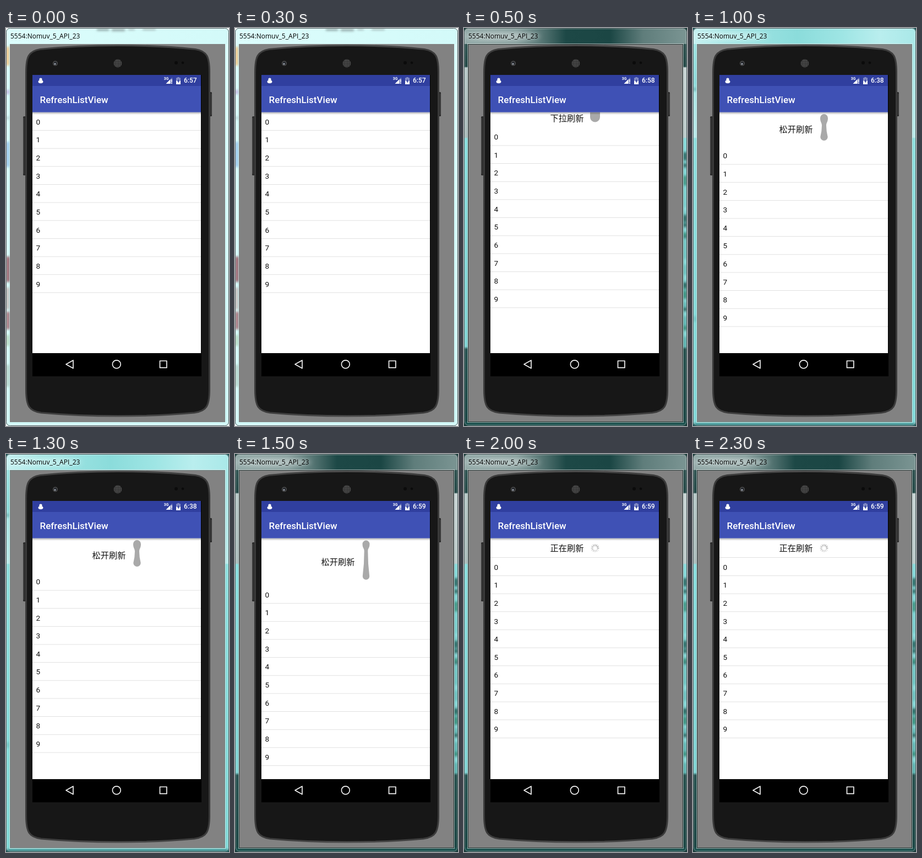
Animation of 405x721 px, one loop 2500 ms. Source, as an HTML page:

```html
<!DOCTYPE html>
<html lang="zh">
<head>
<meta charset="utf-8">
<title>RefreshListView</title>
<style>
html, body { margin: 0; width: 100%; height: 100%; overflow: hidden; background: #fff; }
svg { display: block; width: 405px; height: 721px; }
text { white-space: pre; }
.title { font: 12px "Open Sans", "Noto Sans", sans-serif; fill: #000; }
.bar { font: 500 17px Roboto, sans-serif; fill: #fff; }
.time { font: 500 12px Roboto, sans-serif; fill: #fff; }
.net { font: 700 6.8px Roboto, sans-serif; fill: #fff; }
.row { font: 13.6px Roboto, sans-serif; fill: #111; }
.hint { font: 15.2px "Noto Sans CJK SC", "Noto Sans CJK", "Noto Sans", sans-serif; fill: #111; }
</style>
</head>
<body>
<svg viewBox="0 0 405 721" xmlns="http://www.w3.org/2000/svg">
  <defs>
    <filter id="soft" x="-20%" y="-20%" width="140%" height="140%"><feGaussianBlur stdDeviation="2"/></filter>
    <filter id="glow" x="-20%" y="-100%" width="140%" height="300%"><feGaussianBlur stdDeviation="4"/></filter>
    <clipPath id="window"><rect width="405" height="721" rx="7"/></clipPath>
    <clipPath id="list"><rect x="48" y="152.6" width="306" height="436.4"/></clipPath>
    <linearGradient id="rim">
      <stop offset="0" stop-color="#3a3a3a"/><stop offset=".5" stop-color="#4c4c4c"/><stop offset="1" stop-color="#3a3a3a"/>
    </linearGradient>
    <linearGradient id="shade" x2="0" y2="1">
      <stop offset="0" stop-opacity=".3"/><stop offset="1" stop-opacity="0"/>
    </linearGradient>
    <pattern id="mesh" width="2.6" height="2.6" patternUnits="userSpaceOnUse">
      <circle cx="1.3" cy="1.3" r=".85" fill="#777"/>
    </pattern>
  </defs>

  <rect id="backdrop" width="405" height="721"/>
  <g id="glass" clip-path="url(#window)"></g>
  <rect id="shine" x="1.5" y="1.5" width="402" height="718" rx="6" fill="none" stroke="#fff"/>
  <rect x=".5" y=".5" width="404" height="720" rx="7" fill="none" stroke="#2b3f40" stroke-opacity=".85"/>
  <ellipse id="halo" cx="70" cy="15" rx="68" ry="8" fill="#fff" filter="url(#glow)"/>
  <text class="title" x="8" y="19">5554:Nomuv_5_API_23</text>

  <rect x="7" y="29" width="391" height="685" fill="#828282"/>
  <rect id="inner" x="7.5" y="29.5" width="390" height="684" fill="none"/>
  <rect id="outer" x="6.5" y="28.5" width="392" height="686" fill="none" stroke="#fff"/>

  <rect x="31" y="160" width="6" height="107" rx="1.5" fill="#2b2b2b"/>
  <rect x="31.5" y="163" width="1.2" height="101" fill="#4a4a4a"/>
  <rect x="369" y="116" width="5" height="44" rx="1.5" fill="#2b2b2b"/>
  <rect x="372.3" y="119" width="1" height="38" fill="#4a4a4a"/>
  <path fill="#171717" stroke="url(#rim)" stroke-width="3"
    d="M36.5 80C36.5 52 41 42 62 38.5Q130 31.5 203 31.5Q276 31.5 344 38.5C365 42 369.5 52 369.5 80V655C369.5 685 364 694 342 697Q276 703 203 703Q130 703 64 697C42 694 36.5 685 36.5 655Z"/>
  <circle cx="89.5" cy="64" r="4.6" fill="#4a4a4a"/>
  <circle cx="89.5" cy="64" r="3" fill="#22252a"/>
  <circle cx="89" cy="65" r="1.6" fill="#a5abb5"/>
  <circle cx="203" cy="64" r="7.6" fill="#222"/>
  <circle cx="203" cy="64" r="7.4" fill="url(#mesh)"/>
  <g fill="#0b0b0b"><circle cx="309" cy="63" r="3"/><circle cx="321" cy="63" r="2.2"/></g>

  <rect x="48" y="85" width="307" height="546" fill="#000"/>
  <rect x="48" y="152" width="306" height="437" fill="#fff"/>
  <g clip-path="url(#list)">
    <g id="rows"></g>
    <g id="head">
      <text id="hint" class="hint" x="156.6"></text>
      <path id="drop" fill="#a9a9a9"/>
      <g id="spin"></g>
    </g>
  </g>
  <rect x="48" y="152.6" width="306" height="4.4" fill="url(#shade)"/>
  <rect x="48" y="85" width="306" height="20" fill="#303f9f"/>
  <rect x="48" y="105" width="306" height="47.6" fill="#3f51b5"/>
  <text class="bar" x="61.6" y="135.6">RefreshListView</text>

  <g fill="#fff">
    <circle cx="63" cy="93" r="2.6"/>
    <ellipse cx="63" cy="97.3" rx="4.4" ry="3"/>
    <path d="M290.5 101L302 89.5V101Z" opacity=".35"/>
    <path d="M290.5 101L298.5 93V101Z"/>
    <path d="M300.2 93h1.5v5h-1.5zM300.2 99.3h1.5v1.7h-1.5z"/>
    <path d="M309 90.2h2.3V89h3.4v1.2h2.3v5.3h-8z" opacity=".4"/>
    <path d="M309 95.5h8V102h-8z"/>
  </g>
  <path d="M313.7 91.7L310.8 96.7H312.7V100.3L315.5 95.3H313.7Z" fill="#303f9f"/>
  <text class="net" x="286.8" y="94.3">3G</text>
  <text id="time" class="time" x="323" y="99.4"></text>

  <g fill="none" stroke="#f2f2f2" stroke-width="1.7" stroke-linejoin="round">
    <path d="M122 602V616.4L109 609.2Z"/>
    <circle cx="200.8" cy="609.2" r="7.4"/>
    <rect x="279.5" y="603" width="12.4" height="12.4"/>
  </g>
</svg>
<script>
const NS = 'http://www.w3.org/2000/svg';
const $ = id => document.getElementById(id);
const STEP = 500, TOP = 153, PITCH = 32.65, CX = 238;

function add(parent, tag, attrs) {
  const el = document.createElementNS(NS, tag);
  for (const k in attrs) el.setAttribute(k, attrs[k]);
  return parent.appendChild(el);
}

function gradient(id, stops, vertical) {
  const size = vertical ? 721 : 405;
  const g = add(document.querySelector('defs'), 'linearGradient', {
    id, gradientUnits: 'userSpaceOnUse', x1: 0, y1: 0, x2: vertical ? 0 : size, y2: vertical ? size : 0
  });
  for (const [at, color] of stops) add(g, 'stop', { offset: at / size, 'stop-color': color });
  return `url(#${id})`;
}

// Window glass: title bar, two side strips and a bottom strip.
function makeGlass(name, look) {
  const g = add($('glass'), 'g', {});
  const strip = (x, y, width, height, fill) => add(g, 'rect', { x, y, width, height, fill });
  strip(0, 29, 8, 692, gradient(name + 'L', look.left, true));
  strip(397, 29, 8, 692, gradient(name + 'R', look.right, true));
  strip(0, 0, 405, 29, gradient(name + 'T', look.title));
  strip(0, 713, 405, 8, look.bottom);
  const blur = add(g, 'g', { filter: 'url(#soft)' });
  for (const [x, y, width, height, fill] of look.blobs) add(blur, 'rect', { x, y, width, height, fill });
  return g;
}

let seed = 7;
const random = () => (seed = seed * 16807 % 2147483647) / 2147483647;
const specks = Array.from({ length: 24 }, (_, i) =>
  [399, 225 + random() * 345, 6, 4 + random() * 12, ['#1d524d', '#8adada', '#2f8570'][i % 3]]);

const looks = {
  pale: {
    title: [[0, '#dcfdfc'], [405, '#d3faf9']],
    left: [[29, '#d8fcfb'], [721, '#d2f8f7']],
    right: [[29, '#dafdfc'], [721, '#cdf7f6']],
    bottom: '#d3faf9', edge: '#828282', line: 0, halo: 0, shine: .55, back: '#fff',
    blobs: [
      [165, 0, 22, 5, '#93aaaa'], [192, 0, 24, 6, '#9db3b3'], [222, 0, 12, 4, '#a9bebe'], [248, 0, 24, 4, '#a5baba'],
      [0, 34, 5, 34, '#f0b668'], [0, 112, 5, 8, '#b7a3d8'], [0, 160, 5, 6, '#b4cbd0'],
      [0, 206, 5, 46, '#83b5e6'], [0, 414, 6, 46, '#8b4a55'], [0, 470, 5, 40, '#b9a9a9'],
      [0, 514, 6, 32, '#995f67'], [0, 556, 5, 20, '#a9cdb0'], [0, 610, 5, 40, '#a8c6bc']
    ]
  },
  dark: {
    title: [[0, '#93aaa8'], [95, '#839c9a'], [140, '#587775'], [185, '#1d4846'], [265, '#1b4644'], [325, '#5f7d7b'], [405, '#7b9593']],
    left: [[29, '#2f5351'], [70, '#1f4543'], [72, '#b6c8c7'], [198, '#a9bbba'], [200, '#86dddd'], [577, '#7dd2d2'], [582, '#234f4d'], [721, '#174341']],
    right: [[29, '#2c4f4d'], [70, '#1f4543'], [72, '#c6d3d3'], [198, '#bac9c8'], [200, '#84d8d8'], [577, '#5cb0ad'], [582, '#224d4a'], [721, '#174341']],
    bottom: '#1d524f', edge: '#20302f', line: .55, halo: .4, shine: .35, back: '#173a38',
    blobs: specks
  },
  aqua: {
    title: [[0, '#c6f1f1'], [60, '#a5e6e5'], [190, '#8bdcdb'], [270, '#9ee5e4'], [340, '#b9eeee'], [405, '#a9e8e8']],
    left: [[29, '#9ce3e2'], [100, '#8bdada'], [118, '#a9e6e5'], [198, '#b9e9e9'], [200, '#8cdfde'], [721, '#7fd8d7']],
    right: [[29, '#a7e7e6'], [198, '#b9e9e9'], [200, '#8cdfde'], [721, '#7fd8d7']],
    bottom: '#83d8d7', edge: '#6f8584', line: .5, halo: .35, shine: .4, back: '#1d4f50',
    blobs: [[0, 108, 5, 6, '#5fa8a8'], [0, 522, 5, 10, '#69bcbc'], [0, 717, 405, 6, '#1b6566']]
  }
};
for (const name in looks) looks[name].el = makeGlass(name, looks[name]);

for (let i = 0; i < 10; i++) {
  add($('rows'), 'text', { class: 'row', x: 54.4, y: TOP + 21.7 + i * PITCH }).textContent = i;
  add($('rows'), 'rect', { x: 48, y: TOP + 32.1 + i * PITCH, width: 306, height: .85, fill: '#dcdcdc' });
}
const headLine = add($('head'), 'rect', { x: 48, y: 187, width: 306, height: .85, fill: '#dcdcdc' });

for (let i = 0; i < 12; i++) {
  add($('spin'), 'rect', {
    x: CX - .7, y: 163, width: 1.4, height: 4, rx: .7, fill: '#777',
    opacity: .3 + .4 * ((i + 8) % 12) / 11, transform: `rotate(${i * 30} ${CX} 170.5)`
  });
}

// Rubber drop: a round cap at each end, a pinch under the top one, a flare to the bottom one.
function dropPath({ y1, r1, y2, r2, neck, bend }) {
  const pinch = y1 + bend * 1.7, mid = (pinch + y2) / 2;
  return `M${CX - r1} ${y1}A${r1} ${r1} 0 0 1 ${CX + r1} ${y1}` +
    `C${CX + r1} ${y1 + bend} ${CX + neck} ${y1 + bend} ${CX + neck} ${pinch}` +
    `Q${CX + neck} ${mid} ${CX + r2} ${y2}` +
    `A${r2} ${r2} 0 0 1 ${CX - r2} ${y2}` +
    `Q${CX - neck} ${mid} ${CX - neck} ${pinch}` +
    `C${CX - neck} ${y1 + bend} ${CX - r1} ${y1 + bend} ${CX - r1} ${y1}Z`;
}

const pull = '下拉刷新', release = '松开刷新', busy = '正在刷新';
const poses = [
  { look: 'pale', time: '6:57', shift: 0 },
  { look: 'dark', time: '6:58', shift: 27.4, hint: pull, mid: 163,
    drop: { y1: 150, r1: 9, y2: 161.5, r2: 9, neck: 9, bend: 3 } },
  { look: 'aqua', time: '6:38', shift: 61.5, hint: release, mid: 183.5,
    drop: { y1: 163, r1: 7, y2: 197.3, r2: 6.7, neck: 4, bend: 8 } },
  { look: 'dark', time: '6:59', shift: 85.1, hint: release, mid: 195.5,
    drop: { y1: 163, r1: 6.5, y2: 221.5, r2: 6.2, neck: 3.3, bend: 7.5 } },
  { look: 'dark', time: '6:59', shift: 34.9, hint: busy, mid: 170.5, spin: true }
];

const show = (el, on) => el.setAttribute('display', on ? 'inline' : 'none');

function draw(ms) {
  const p = poses[Math.floor(ms / STEP) % poses.length];
  const look = looks[p.look];
  for (const name in looks) show(looks[name].el, name === p.look);
  $('backdrop').setAttribute('fill', look.back);
  $('inner').setAttribute('stroke', look.edge);
  $('outer').setAttribute('stroke-opacity', look.line);
  $('shine').setAttribute('stroke-opacity', look.shine);
  $('halo').setAttribute('opacity', look.halo);
  $('time').textContent = p.time;
  $('rows').setAttribute('transform', `translate(0 ${p.shift})`);
  show($('head'), p.hint);
  show($('drop'), p.drop);
  show($('spin'), p.spin);
  show(headLine, p.spin);
  if (p.hint) {
    $('hint').textContent = p.hint;
    $('hint').setAttribute('y', p.mid + 5.6);
  }
  if (p.drop) $('drop').setAttribute('d', dropPath(p.drop));
}

const start = performance.now();
function tick() {
  draw(performance.now() - start);
  requestAnimationFrame(tick);
}
tick();
</script>
</body>
</html>
```
